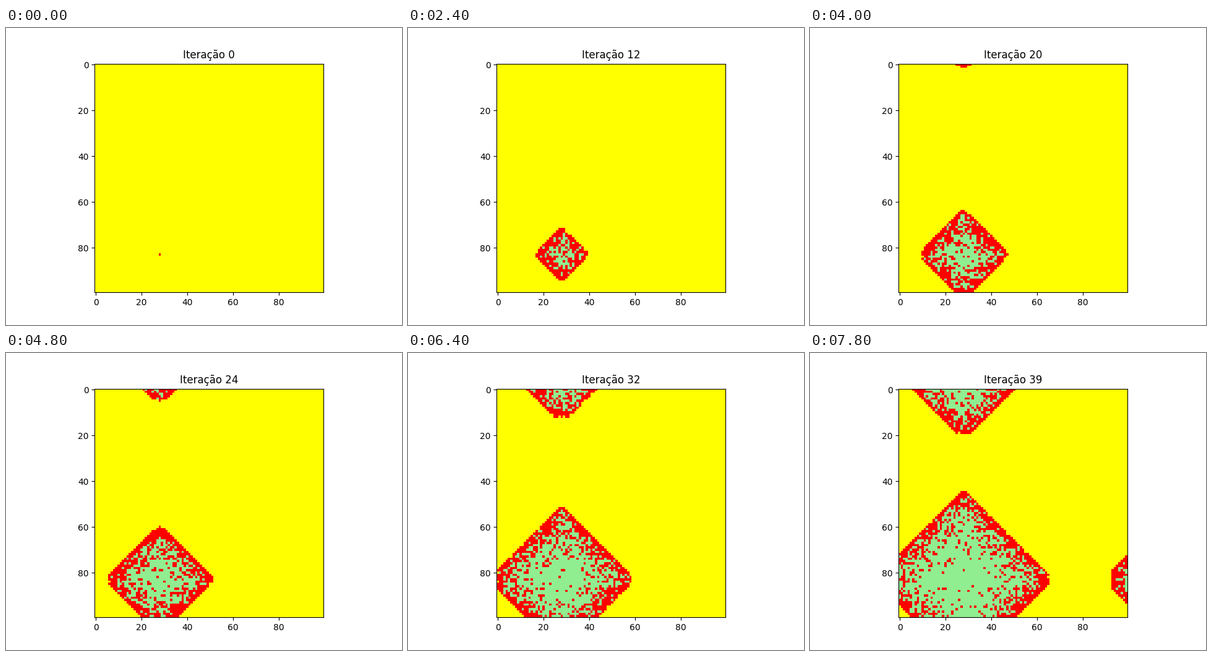
A matplotlib script that plays this animation: 640x480 px, repeating every 8 s.

```python
import numpy as np
import matplotlib.pyplot as plt
from matplotlib.animation import FuncAnimation
from matplotlib.colors import ListedColormap

SIZE = 100
STEPS = 40
COL, ROW = 28, 83
RECOVERY = 0.1

# Distances at which the front loses one more step along each axis.
UP = [3]
DOWN = [2, 16, 27]
LEFT = [2, 16, 23, 26]
RIGHT = [4, 28]

rng = np.random.default_rng(12)


def reach(d, losses):
    """Step at which the front gets d cells away along one axis."""
    return d + np.searchsorted(losses, d, side="right")


def wrapped(center, back):
    """Signed offsets on the torus, with `back` cells on the negative side."""
    return (np.arange(SIZE) - center + back) % SIZE - back


def infection_times():
    dx, dy = np.meshgrid(wrapped(COL, 45), wrapped(ROW, 50))
    ax, ay = abs(dx), abs(dy)
    tx = np.where(dx < 0, reach(ax, LEFT), reach(ax, RIGHT))
    ty = np.where(dy < 0, reach(ay, UP), reach(ay, DOWN))
    time = np.maximum(ax + ay, np.maximum(tx, ty))

    # The front is ragged near its tips and almost straight elsewhere.
    minor = np.minimum(ax, ay)
    miss = np.where(minor <= 2, 0.3, 0.04)
    miss[minor == 0] = 0
    return time + (rng.random(time.shape) < miss)


infected = infection_times()
recovered = infected + rng.geometric(RECOVERY, infected.shape)
recovered[ROW, COL] = 5


def grid(step):
    return (infected <= step).astype(int) + (recovered <= step)


fig, ax = plt.subplots(figsize=(6.4, 4.8), dpi=100)
cmap = ListedColormap(["yellow", "red", "lightgreen"])
image = ax.imshow(grid(0), cmap=cmap, vmin=0, vmax=2, interpolation="nearest")
title = ax.set_title("Iteração 0")


def update(step):
    image.set_data(grid(step))
    title.set_text(f"Iteração {step}")
    return image, title


anim = FuncAnimation(fig, update, frames=STEPS, interval=200, repeat=True,
                     repeat_delay=0, blit=False)
plt.show()
```
